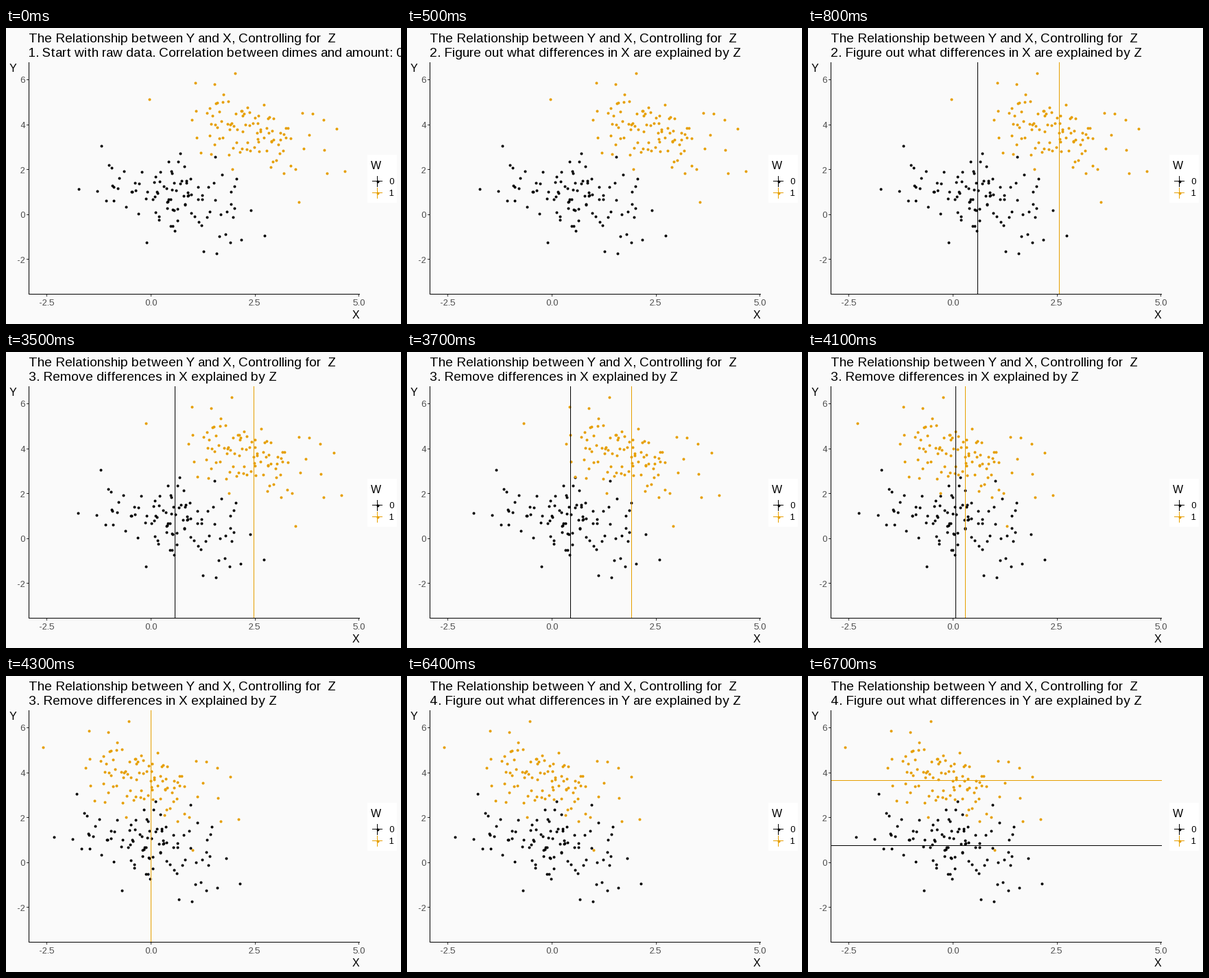
Recreate the animation shown at these times as a matplotlib script. Size 576 by 432 pixels, loop 8 s.

```python
import math

import numpy as np
import matplotlib.pyplot as plt
from matplotlib.animation import FuncAnimation
from matplotlib.patches import Rectangle

WIDTH, HEIGHT = 576, 432
STEP, LOOP = 100, 8000
INK, GOLD = "#000000", "#E69F00"
BACK, TICK, LABEL = "#FAFAFA", "#333333", "#4D4D4D"
LEFT, RIGHT, TOP, BOTTOM = 33, 516, 50, 388
X_ZERO, X_UNIT = 211.5, 60.65
Y_ZERO, Y_UNIT = 272.3, 32.8
SLOPE = 0.5 * Y_UNIT / X_UNIT  # Y falls by half a unit per unit of X
INK_SHIFT, GOLD_SHIFT = 35.8, 155.0  # group means of X, in pixels from zero
SHOW_X, SLIDE_START, SLIDE_TIME, HIDE_X, SHOW_Y = 800, 3400, 900, 6400, 6700

CAPTIONS = [
    (0, "1. Start with raw data. Correlation between dimes and amount: 0.3"),
    (500, "2. Figure out what differences in X are explained by Z"),
    (3500, "3. Remove differences in X explained by Z"),
    (6400, "4. Figure out what differences in Y are explained by Z"),
]

# Extreme points of each group
INK_EDGE = [(106, 235), (139, 172), (254, 183), (305, 188),
            (205, 313), (288, 326), (307, 329), (377, 303)]
GOLD_EDGE = [(209, 104), (276, 80), (334, 66), (463, 134),
             (284, 182), (330, 206), (427, 254), (494, 209)]

rng = np.random.RandomState(12)


def cloud(edge, center_x, center_y, count=92):
    """Extreme points plus a random core that slopes down to the right."""
    dx = 122 * rng.triangular(-1, 0, 1, count)
    dy = SLOPE * dx + 58 * rng.triangular(-1, 0, 1, count)
    return np.vstack([edge, np.column_stack([center_x + dx, center_y + dy])])


ink_points = cloud(INK_EDGE, 247, 247)
gold_points = cloud(GOLD_EDGE, 365, 151)

plt.rcParams.update({"font.family": "Liberation Sans",
                     "text.hinting_factor": 1,  # whole-pixel letter spacing
                     "text.kerning_factor": 6})
fig = plt.figure(figsize=(WIDTH / 72, HEIGHT / 72), dpi=72, facecolor=BACK)
ax = fig.add_axes([0, 0, 1, 1])
ax.set_xlim(0, WIDTH)
ax.set_ylim(HEIGHT, 0)
ax.axis("off")


def line(x0, y0, x1, y1, color, z=1):
    return ax.plot([x0, x1], [y0, y1], color=color, lw=1, zorder=z,
                   snap=False, solid_capstyle="butt")[0]


def vertical(x, y0, y1, color, z=1):
    return line(pixel(x), y0, pixel(x), y1, color, z)


def horizontal(y, x0, x1, color, z=1):
    return line(x0, pixel(y), x1, pixel(y), color, z)


def text(x, y, string, size, color=INK, ha="left"):
    return ax.text(x, y, string, fontsize=size, color=color, ha=ha,
                   va="baseline")


def dots(points, color, z=2):
    return ax.scatter(points[:, 0], points[:, 1], s=16, c=color,
                      linewidths=0, antialiased=False, zorder=z)


def pixel(value):
    """Centre of the pixel that holds the value."""
    return math.floor(value) + 0.5


# Axes
vertical(LEFT, TOP, BOTTOM + 1, INK)
horizontal(BOTTOM, LEFT, RIGHT, INK)
for value in range(-2, 7, 2):
    y = Y_ZERO - value * Y_UNIT
    horizontal(y, LEFT - 3, LEFT, TICK)
    text(28, y + 5, str(value), 13, LABEL, "right")
for value in np.arange(-2.5, 5.1, 2.5):
    x = X_ZERO + value * X_UNIT
    vertical(x, BOTTOM + 1, BOTTOM + 4, TICK)
    text(x, 405, f"{value:.1f}", 13, LABEL, "center")
text(4.5, 64, "Y", 16)
text(515.5, 424, "X", 16, ha="right")

# Legend
ax.add_patch(Rectangle((527, 185), 43, 70, color="white", lw=0))
text(532, 206, "W", 16)
for name, y, color in (("0", 223, INK), ("1", 240, GOLD)):
    horizontal(y, 534, 549, color)
    vertical(541, y - 7, y + 9, color)
    dots(np.array([[541.5, y + 0.5]]), color)
    text(558, y + 5, name, 13)

# Titles
text(33, 21, "The Relationship between Y and X, Controlling for  Z", 19)
caption = text(33, 42, "", 19)

ink_dots = dots(ink_points, INK)
gold_dots = dots(gold_points, GOLD, 3)
ink_x = vertical(0, TOP, BOTTOM, INK, 4)
gold_x = vertical(0, TOP, BOTTOM, GOLD, 5)
ink_y = horizontal(247, LEFT + 1, RIGHT, INK, 4)
gold_y = horizontal(152, LEFT + 1, RIGHT, GOLD, 5)


def update(frame):
    time = frame * STEP
    caption.set_text([s for start, s in CAPTIONS if time >= start][-1])

    progress = min(max((time - SLIDE_START) / SLIDE_TIME, 0), 1)
    moved = (1 - math.cos(math.pi * progress)) / 2
    groups = ((ink_dots, ink_points, ink_x, INK_SHIFT),
              (gold_dots, gold_points, gold_x, GOLD_SHIFT))
    for marks, points, mean_line, shift in groups:
        marks.set_offsets(points - [shift * moved, 0])
        x = pixel(X_ZERO + shift * (1 - moved))
        mean_line.set_xdata([x, x])
        mean_line.set_visible(SHOW_X <= time < HIDE_X)
    for mean_line in (ink_y, gold_y):
        mean_line.set_visible(time >= SHOW_Y)
    return ()


animation = FuncAnimation(fig, update, frames=LOOP // STEP, interval=STEP,
                          repeat=True, repeat_delay=0, blit=False)
plt.show()
```
